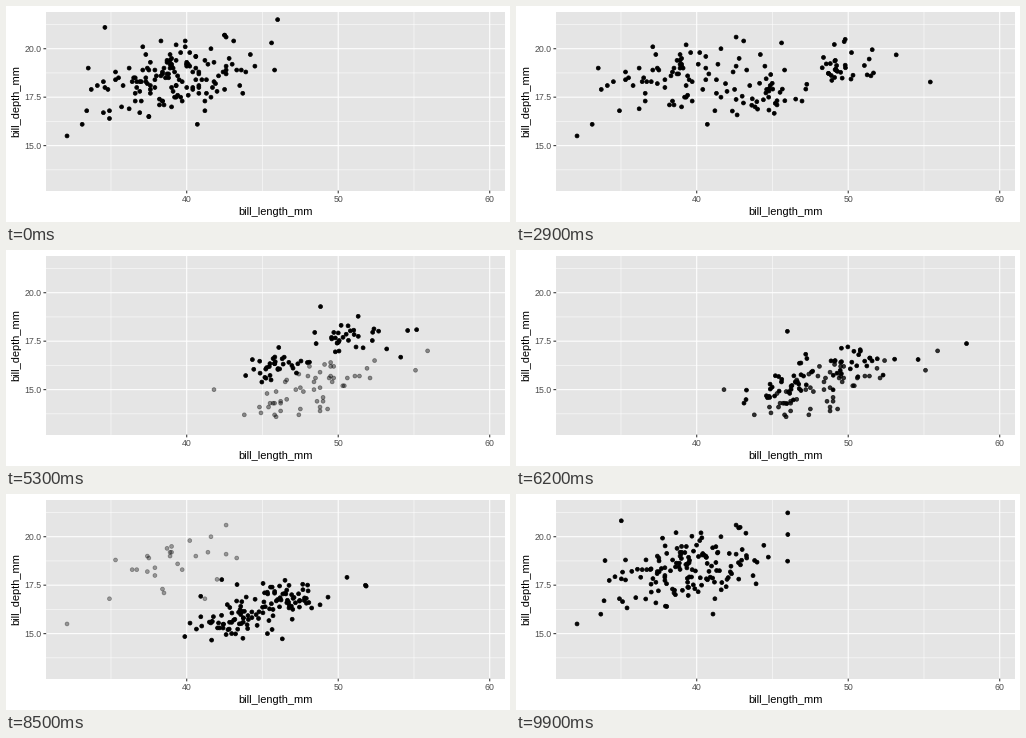
Animation of 504x216 px, one loop 10 s. Source, as a matplotlib script:

```python
import numpy as np
import matplotlib.pyplot as plt
from matplotlib.animation import FuncAnimation

plt.rcParams["font.family"] = "Liberation Sans"

W, H, DPI = 504, 216, 72
LEFT, RIGHT, TOP, BOTTOM = 40.2, 498.5, 5.5, 184.6
XLIM, YLIM = (30.725, 60.975), (12.68, 21.92)
PANEL, LABEL, TICK = "#E5E5E5", "#4D4D4D", "#333333"


def species(n, female, male, spread, outliers, seed):
    """Bounded bell clouds, one per sex on alternate rows, plus a few outliers."""
    rng = np.random.default_rng(seed)
    centre = np.where(np.arange(n)[:, None] % 2, male, female)
    bell = rng.triangular(-2.2, 0, 2.2, (n, 2))
    bell[:, 1] += 0.15 * bell[:, 0]
    data = np.round(centre + bell * spread, 1)
    for row, point in outliers.items():
        data[row] = point
    return data


STATES = [
    species(151, (37.6, 17.7), (39.9, 18.8), (2.2, 1.05),
            {14: (34.6, 21.1), 17: (42.5, 20.7), 19: (46.0, 21.5),
             70: (33.5, 19.0), 73: (45.8, 18.9), 98: (33.1, 16.1),
             111: (45.6, 20.3), 142: (32.1, 15.5)}, seed=4),
    species(68, (46.4, 17.5), (51.0, 19.2), (1.7, 0.75),
            {17: (58.0, 17.8), 33: (51.0, 18.8), 37: (52.0, 20.7),
             63: (55.8, 19.8)}, seed=8),
    species(123, (45.6, 14.3), (49.4, 15.7), (2.0, 0.6),
            {33: (59.6, 17.0), 37: (44.4, 17.3), 63: (54.3, 15.7),
             85: (55.9, 17.0), 111: (55.1, 16.0)}, seed=15),
]
MOVES = [(9, 33), (43, 67), (77, 100)]


def tween(a, b, t):
    """Shared rows glide, surplus old rows stay, surplus new rows fade in."""
    n = min(len(a), len(b))
    points = np.vstack([a[:n] + (b[:n] - a[:n]) * t, a[n:], b[n:]])
    alpha = np.ones(len(points))
    if len(b) > n:
        alpha[n:] = t
    return points, alpha


def pose(frame):
    for i, (start, end) in enumerate(MOVES):
        if frame < end:
            t = max(0, (frame - start) / (end - start))
            if t == 0:
                return STATES[i], np.ones(len(STATES[i]))
            return tween(STATES[i], STATES[(i + 1) % len(STATES)], t)


fig = plt.figure(figsize=(W / DPI, H / DPI), dpi=DPI, facecolor="white")
ax = fig.add_axes([LEFT / W, 1 - BOTTOM / H, (RIGHT - LEFT) / W, (BOTTOM - TOP) / H])
ax.set(xlim=XLIM, ylim=YLIM, facecolor=PANEL, xticks=[], yticks=[])
for side in ax.spines.values():
    side.set_visible(False)


def px(x):
    return LEFT + (x - XLIM[0]) / (XLIM[1] - XLIM[0]) * (RIGHT - LEFT)


def py(y):
    return BOTTOM - (y - YLIM[0]) / (YLIM[1] - YLIM[0]) * (BOTTOM - TOP)


def label(x, y, text, size=11, color="black", ha="center", **kw):
    fig.text(x / W, 1 - y / H, text, fontsize=size, color=color, ha=ha,
             va="baseline", **kw)


def tick(xs, ys):
    fig.add_artist(plt.Line2D(np.array(xs) / W, 1 - np.array(ys) / H, lw=1.07,
                              color=TICK, solid_capstyle="butt", snap=False))


def grid(draw, values, width):
    for v in values:
        draw(v, color="white", lw=width, zorder=0.5, snap=False)


x_major, y_major = np.arange(40, 61, 10), np.arange(15, 21, 2.5)
grid(ax.axvline, x_major - 5, 0.53)
grid(ax.axhline, np.arange(13.75, 22, 2.5), 0.53)
grid(ax.axvline, x_major, 1.07)
grid(ax.axhline, y_major, 1.07)

for v in x_major:
    tick((px(v), px(v)), (BOTTOM, BOTTOM + 2.75))
    label(px(v), 195.9, str(v), 8.8, LABEL)
for v in y_major:
    tick((LEFT - 2.75, LEFT), (py(v), py(v)))
    label(LEFT - 4.5, py(v) + 3, f"{v:.1f}", 8.8, LABEL, ha="right")

label((LEFT + RIGHT) / 2, 209, "bill_length_mm")
label(13.6, (TOP + BOTTOM) / 2, "bill_depth_mm", rotation=90,
      rotation_mode="anchor")

dots = ax.scatter([], [], s=3.92 ** 2, linewidths=0.71, zorder=3)


def update(frame):
    points, alpha = pose(frame)
    colors = np.zeros((len(points), 4))
    colors[:, 3] = alpha
    dots.set_offsets(points)
    dots.set_facecolors(colors)
    dots.set_edgecolors(colors)
    return (dots,)


anim = FuncAnimation(fig, update, frames=100, interval=100, repeat=True,
                     repeat_delay=0, init_func=lambda: update(0))
plt.show()
```
